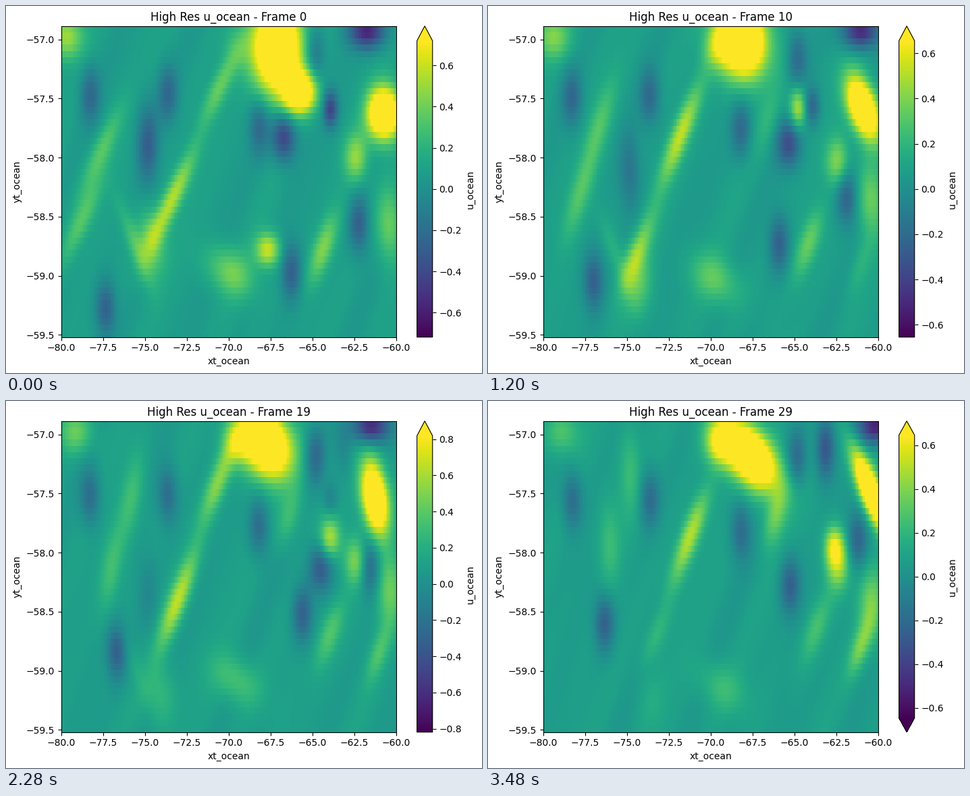
A matplotlib script for the animation above (3600 ms loop, 705 by 545 pixels).

```python
import numpy as np
import matplotlib.pyplot as plt
from matplotlib.animation import FuncAnimation

W, H, DPI, PAD = 705, 545, 100, 10
FRAMES, STEP = 30, 120
NX, NY = 200, 50

lon = np.linspace(-80, -60, NX + 1)
lat = np.linspace(-59.52, -56.886, NY + 1)
# cell centres in stage pixels
X, Y = np.meshgrid(82 + (np.arange(NX) + .5) * 496 / NX,
                   492 - (np.arange(NY) + .5) * 462 / NY)

rng = np.random.default_rng(4)
WAVES = [(rng.uniform(8, 20), rng.uniform(.2, .45), rng.uniform(0, 6.28))
         for _ in range(5)]


def path(s, *points):
    """Position at s in 0..1 along evenly spaced points."""
    u = np.linspace(0, 1, len(points))
    if np.ndim(points[0]) == 0:
        return np.interp(s, u, points)
    return np.array([np.interp(s, u, c) for c in zip(*points)])


def spot(at, size, a, lean=0):
    """Gaussian eddy; lean tilts its axis to the right going up."""
    dx, dy = X - at[0], Y - at[1]
    return a * np.exp(-((dx + lean * dy) / size[0])**2 - (dy / size[1])**2)


def streaks(k):
    return .012 * sum(np.cos((X + lean * Y) / w + p + .15 * k)
                      for w, lean, p in WAVES)


def filament(k):
    """Long leaning jet with crests that climb it at a steady speed."""
    s = k / 29
    crest = np.cos(2 * np.pi * (Y - 290 + 10 * k) / 200)
    fade = np.exp(-((Y - 235) / path(s, 150, 190, 130))**4)
    dx = X - path(s, 281, 280, 298) + path(s, .42, .34, .34) * (Y - 205)
    return (.45 + .25 * crest) * fade * np.exp(-(dx / 15)**2)


def north_jet(s):
    v = spot(path(s, (402, 62), (376, 50), (385, 62), (387, 80)),
             (36, path(s, 66, 50, 50)), 1.8, path(s, 0, -.1, -.45))
    v += spot((342, 62), (20, 32), path(s, .2, .4, .7))
    v += spot(path(s, (435, 128), (458, 150), (481, 205), (513, 215)),
              (path(s, 24, 12, 15, 14), 30), path(s, 1.4, .7, .65, .75))
    return v + spot((410 + 16 * s, 170), (16, 45), .45 * s, .2)


def east_jet(s):
    lean = path(s, 0, .15, -.4, 0, -.4, -.35)
    x = path(s, 560, 562, 553, 543, 556, 567)
    v = spot((x, 160 - 25 * s), (24 - 8 * s, 38 + 22 * s), 1.7, lean)
    v += spot((518, 225 + 20 * s), (17, 36), .55)
    v += spot((568, path(s, 325, 270, 300)), (19, 55), .45)
    v += spot((552, 395 - 30 * s), (13, 42), .45 * s, .28)
    return v + spot((470 + 16 * s, 360 - 22 * s), (16, 50), .5 - .2 * s, .3)


def green_patches(s):
    v = spot((90 + 20 * s, 46), (25, 33), .6 - .25 * s)
    v += spot((332 + 14 * s, 395 + 30 * s), (34, 38), .45 - .2 * s, -.35)
    v += spot((388, 362), (18, 25), .75 * max(0, 1 - 4 * s))
    v += spot(path(s, (215, 355), (226, 435), (242, 445)), (21, 48), .5 - .4 * s)
    v += spot((190, 350 + 60 * s), (12, 60), .25 * (1 - s), -.35)
    for x, y in ((142, 215), (112, 320)):
        v += spot((x + 68 * s, y - 110 * s), (16, 65), .36 - .1 * s, .42 * (1 - s))
    return v


def dark_patches(s):
    v = 0
    for x, y in ((148, 450), (423, 395), (523, 325)):
        v += spot((x + 25 * s, y - 120 * s), (15, 42), -.5)
    for x, y in ((125, 132), (240, 130), (375, 178), (458, 72)):
        v += spot((x, y + 15 * s), (15, 42), -.42)
    v += spot((210, 205 + 120 * s), (16, 60), -.5 * (1 - s))
    v += spot(path(s, (412, 195), (445, 203), (467, 250), (478, 275)),
              (18, 36), path(s, -.75, -.6, -.55, 0))
    v += spot((481, 153 - 10 * s), (11, 27), -.7 * (1 - s))
    v += spot((500, 70), (14, 46), -.6 * max(0, 2 * s - 1))
    v += spot((path(s, 535, 560, 550, 533, 562, 575), 38), (27, 25), -.9)
    return v


def flow(k):
    """Velocity relative to the colour limit."""
    s = k / 29
    return (.11 + streaks(k) + filament(k) + north_jet(s) + east_jet(s)
            + green_patches(s) + dark_patches(s))


def limit(k):
    return np.interp(k, (0, 6, 10, 15, 19, 25, 29),
                     (.719, .698, .655, .6275, .8186, .790, .646))


def box(x, w):
    return fig.add_axes([(x + origin[0]) / W, (66 + origin[1]) / H, w / W, 462 / H])


def draw(k):
    fig.clear()
    ax, cax = box(100, 496), box(627, 23.1)
    lim = limit(k)
    mesh = ax.pcolormesh(lon, lat, flow(k) * lim, cmap="viridis",
                         vmin=-lim, vmax=lim)
    ax.set_title(f"High Res u_ocean - Frame {k}")
    ax.set_xlabel("xt_ocean")
    ax.set_ylabel("yt_ocean")
    fig.colorbar(mesh, cax=cax, extend="both" if k >= 28 else "max",
                 label="u_ocean")
    return []


fig = plt.figure(figsize=(W / DPI, H / DPI), dpi=DPI)
# place the lower left text exactly PAD pixels from the edges
origin = np.array([-18., -13.])
draw(0)
origin += PAD - DPI * fig.get_tightbbox().min

anim = FuncAnimation(fig, draw, frames=FRAMES, interval=STEP,
                     init_func=lambda: [], repeat=True, repeat_delay=0)
plt.show()
```
